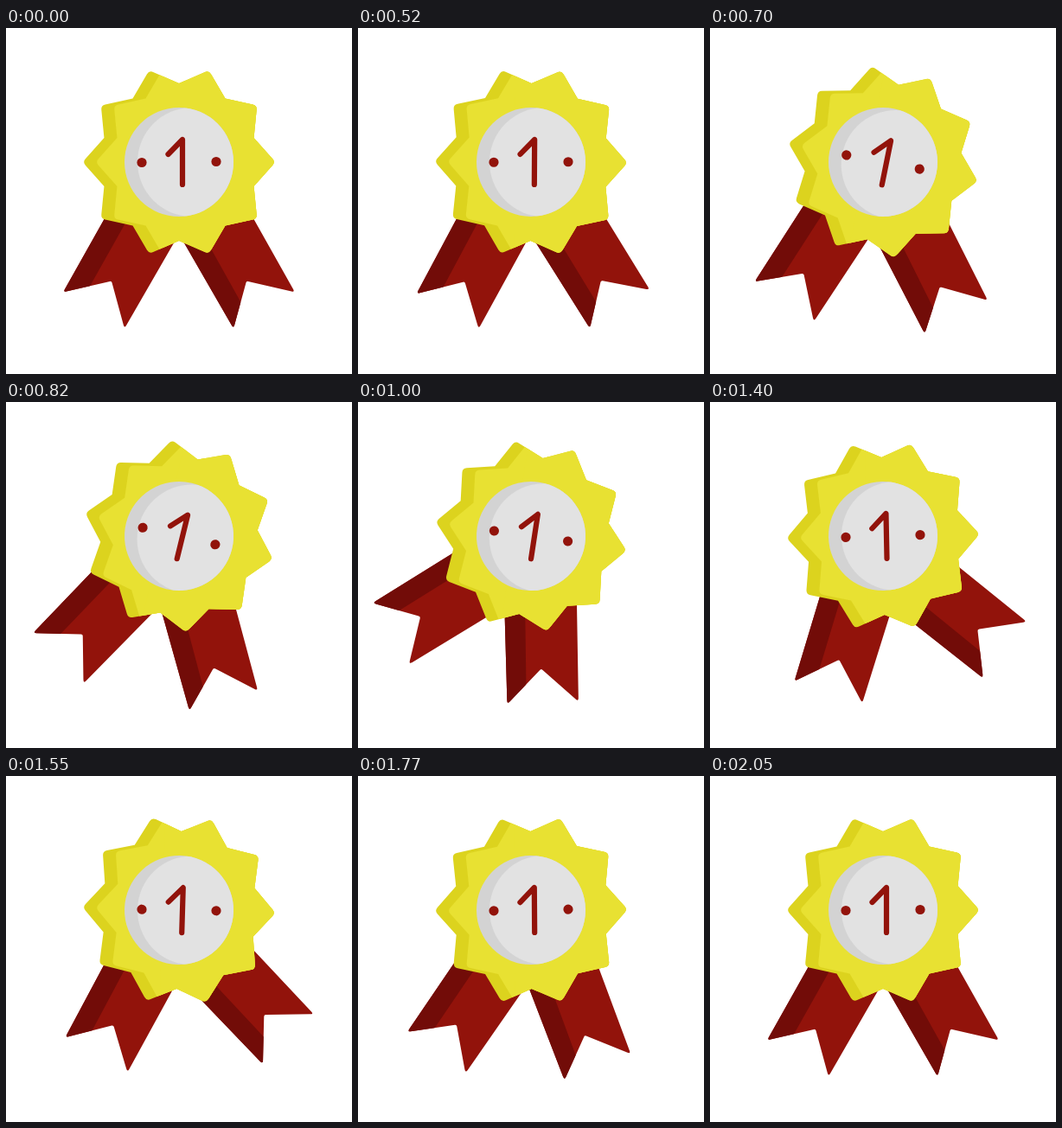
An HTML page that plays this animation: 400 by 400 pixels, repeating every 2070 ms.

```html
<!DOCTYPE html>
<html lang="en">
<head>
<meta charset="utf-8">
<title>Award rosette</title>
<style>
  html, body { margin: 0; width: 100%; height: 100%; overflow: hidden; background: #fff; }
  svg { display: block; width: 100%; height: 100%; }
  .red { fill: #92130b; }
  .maroon { fill: #720c08; }
  .yellow { fill: #e8e132; }
  .gold { fill: #dcd31e; }
</style>
</head>
<body>
<svg viewBox="0 0 400 400">
  <defs>
    <path id="star"/>
    <path id="band"/>
    <clipPath id="inStar"><use href="#star"/></clipPath>
    <clipPath id="inBand"><use href="#band"/></clipPath>
    <clipPath id="inDisc"><circle cx="200" cy="155" r="63"/></clipPath>
  </defs>

  <g id="left">
    <use href="#band" class="red"/>
    <path class="maroon" clip-path="url(#inBand)" d="M97 298.6L165.6 176.5L100 160L40 310L90 310Z"/>
  </g>
  <g id="right">
    <g transform="matrix(-1 0 0 1 400 0)">
      <use href="#band" class="red"/>
      <path class="maroon" clip-path="url(#inBand)" d="M128 318L196 196L240 210L160 355L130 355L122 330Z"/>
    </g>
  </g>

  <g id="badge">
    <use href="#star" class="gold"/>
    <g class="yellow" clip-path="url(#inStar)">
      <use href="#star" x="15"/>
      <rect x="181" y="40" width="140" height="230"/>
    </g>
    <circle cx="200" cy="155" r="63" fill="#d3d3d3"/>
    <circle cx="215" cy="155" r="63" fill="#e2e2e2" clip-path="url(#inDisc)"/>
    <circle class="red" cx="157" cy="155.5" r="5.6"/>
    <circle class="red" cx="243" cy="154.5" r="5.6"/>
    <path d="M187.5 146L204 129V181" fill="none" stroke="#92130b" stroke-width="6.2"
      stroke-linecap="round" stroke-linejoin="round"/>
  </g>
</svg>
<script>
  const LOOP = 2070, START = 520, END = 2050;
  const CX = 200, CY = 155;
  const byId = id => document.getElementById(id);

  // Closed path; each point is [x, y, corner cut]
  function roundPath(points) {
    const n = points.length;
    const toward = ([x, y, cut], [u, v]) => {
      const k = cut / Math.hypot(u - x, v - y);
      return `${x + (u - x) * k} ${y + (v - y) * k}`;
    };
    return points.map((p, i) => {
      const prev = points[(i + n - 1) % n], next = points[(i + 1) % n];
      return `${i ? 'L' : 'M'}${toward(p, prev)}Q${p[0]} ${p[1]} ${toward(p, next)}`;
    }).join('') + 'Z';
  }

  const starPoints = Array.from({ length: 20 }, (_, i) => {
    const a = i * Math.PI / 10, r = i % 2 ? 91 : 111.5;
    return [CX + r * Math.cos(a), CY + r * Math.sin(a), i % 2 ? 0 : 5];
  });
  byId('star').setAttribute('d', roundPath(starPoints));
  byId('band').setAttribute('d', roundPath([
    [66, 305.5, 4], [134.6, 183.4, 0], [207, 226, 0], [137, 347.5, 4.5], [122, 292.5, 2]
  ]));

  // Keys: time, angle (and for ribbons a shift x, y)
  const badgeKeys = [
    [520, .3], [700, 11.4], [810, 13.8], [1000, 8.7], [1270, -3.5],
    [1550, 1.7], [1800, -.5], [2050, 0]
  ];
  const leftKeys = [
    [520, -1.2, -.6, -.4], [570, -2.5, -.6, -.4], [700, 3.4, -.9, -.2],
    [1015, 28.9, -3, -1.5], [1250, -6, 4.6, -4.8], [1350, -14, 4, -4.8],
    [1550, -1.3, 1.1, -5], [1700, 9, 0, 0], [1880, -3, 0, 0], [2050, 0, 0, 0]
  ];
  const rightKeys = [
    [520, -2.2, -.8, 1.5], [570, -5, -.6, 1], [700, 2.5, 0, .7],
    [1010, 28.4, -6, -1.7], [1250, 7.8, -7, -3.7], [1435, -24, -2, -1],
    [1550, -14, -1.1, -.6], [1780, 9, 0, 0], [1920, -2, 0, 0], [2050, 0, 0, 0]
  ];

  // Monotone cubic through the keys: turning points come to rest
  function sample(keys, t, c) {
    if (t < START || t >= END) return 0;
    const slope = i => (keys[i + 1][c] - keys[i][c]) / (keys[i + 1][0] - keys[i][0]);
    const tangent = i => {
      if (i === 0) return slope(0);
      if (i === keys.length - 1) return 0;
      const a = slope(i - 1), b = slope(i);
      return a * b > 0 ? 2 * a * b / (a + b) : 0;
    };
    let i = 0;
    while (t >= keys[i + 1][0]) i++;
    const h = keys[i + 1][0] - keys[i][0], u = (t - keys[i][0]) / h, w = 1 - u;
    return keys[i][c] * w * w * (1 + 2 * u) + keys[i + 1][c] * u * u * (3 - 2 * u)
      + h * u * w * (tangent(i) * w - tangent(i + 1) * u);
  }

  // Each ribbon hangs from a point that turns with the badge
  function poseRibbon(id, keys, t, turn, px, py) {
    const a = turn * Math.PI / 180, dx = px - CX, dy = py - CY;
    const x = CX + dx * Math.cos(a) - dy * Math.sin(a) + sample(keys, t, 2);
    const y = CY + dx * Math.sin(a) + dy * Math.cos(a) + sample(keys, t, 3);
    byId(id).setAttribute('transform',
      `translate(${x} ${y}) rotate(${sample(keys, t, 1)}) translate(${-px} ${-py})`);
  }

  function draw(now) {
    const t = now % LOOP, turn = sample(badgeKeys, t, 1);
    byId('badge').setAttribute('transform', `rotate(${turn} ${CX} ${CY})`);
    poseRibbon('left', leftKeys, t, turn, 178, 192);
    poseRibbon('right', rightKeys, t, turn, 222, 192);
  }

  const begin = performance.now();
  function tick() {
    draw(performance.now() - begin);
    requestAnimationFrame(tick);
  }
  tick();
</script>
</body>
</html>
```
